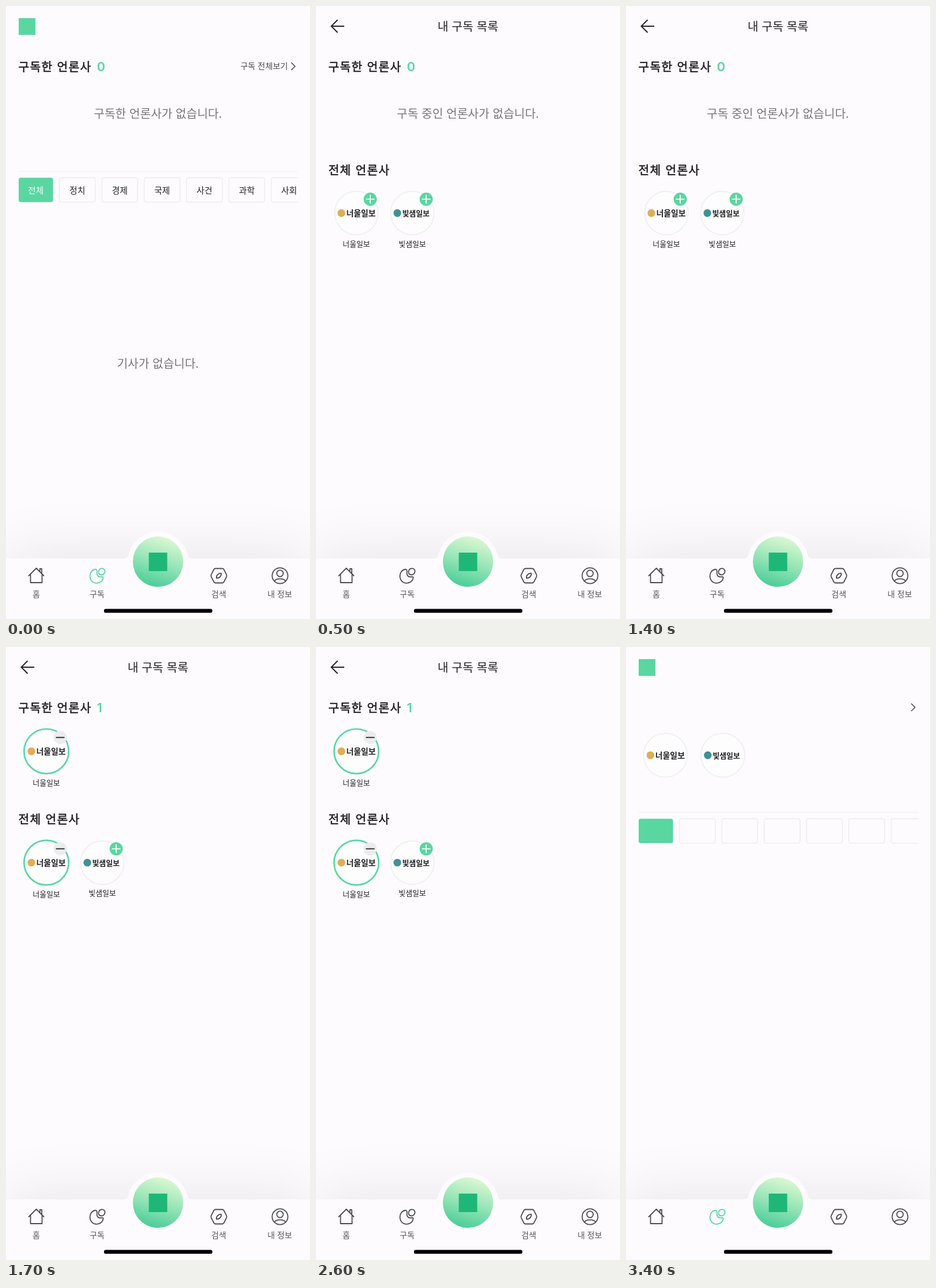
An HTML page that plays this animation: 527x1062 px, repeating every 3.5 s.

```html
<!DOCTYPE html>
<html lang="ko">
<head>
<meta charset="utf-8">
<title>내 구독 목록</title>
<style>
  html, body { margin: 0; width: 100%; height: 100%; overflow: hidden; background: #fdfbfe; }
  #stage { position: relative; width: 527px; height: 1062px; overflow: hidden; }
  #shade { position: absolute; left: 0; top: 957px; width: 527px; height: 105px;
           box-shadow: 0 0 110px rgba(0, 0, 0, .1); }
  svg { position: absolute; left: 0; top: 0; display: block; }
  text { font-family: "Noto Sans CJK KR", "Noto Sans KR", "Noto Sans CJK", "Noto Sans CJK JP", sans-serif; }
  .head { letter-spacing: 1.35px; stroke: #222124; stroke-width: .6px; }
  .num { font-family: Inter, sans-serif; font-weight: 600; }
  .icon { fill: none; stroke: #4b4a4d; stroke-width: 1.8; stroke-linecap: round; stroke-linejoin: round; }
</style>
</head>
<body>
<div id="stage">
  <div id="shade"></div>
  <svg id="art" width="527" height="1062" viewBox="0 0 527 1062">
    <defs>
      <linearGradient id="mint" x1=".68" y1="0" x2=".38" y2="1">
        <stop offset="0" stop-color="#dff8d3"/>
        <stop offset=".5" stop-color="#98e5b8"/>
        <stop offset="1" stop-color="#4acd97"/>
      </linearGradient>
      <clipPath id="row"><rect x="0" y="290" width="506" height="60"/></clipPath>
    </defs>
    <g id="page"></g>
    <path d="M0 957H204Q211 957 212 951A53 53 0 0 1 315 951Q316 957 323 957H527V1062H0Z" fill="#fdfbfe"/>
    <circle cx="263.5" cy="962.7" r="43.6" fill="url(#mint)"/>
    <rect x="247.5" y="947" width="32" height="32" fill="#1fb777"/>
    <g class="icon">
      <path d="M39.5 987L52.5 974L65.5 987M42.5 984.5V999H62.5V984.5M58.8 979.5V975H62V983"/>
      <g id="pie">
        <path d="M154.5 976C148.5 977 145.5 982.5 145.5 987.5C145.5 994.5 150.5 999.8 157 999.8C163 999.8 167.8 996 168.6 990.5C168.8 988.6 167 988.6 165 989C160.5 989.6 157.5 987 157.6 983C157.8 979.5 158.5 975.4 154.5 976Z"/>
        <path d="M161 983.5C159.3 979 161.5 974.6 166 974.4C169.8 974.3 172 977 171.4 980.3C170.6 984.6 165.5 987.6 161 983.5Z"/>
      </g>
      <path d="M363.2 974.5H374.8Q376.6 974.5 377.6 976L382.2 985.2Q383 987 382.2 988.8L377.6 998Q376.6 999.5 374.8 999.5H363.2Q361.4 999.5 360.4 998L355.8 988.8Q355 987 355.8 985.2L360.4 976Q361.4 974.5 363.2 974.5Z"/>
      <path d="M373 982.6C374 986.5 371 991.2 365 991.4C364 987 367.5 982.8 373 982.6Z"/>
      <circle cx="475" cy="987" r="13.6"/>
      <circle cx="475" cy="983" r="5.6"/>
      <path d="M465.5 996.5C468 991 482 991 484.5 996.5"/>
    </g>
    <g id="labels"></g>
    <rect x="169.8" y="1044.6" width="188" height="6.7" rx="3.3" fill="#000"/>
  </svg>
</div>
<script>
const GREEN = '#5ad6a1', INK = '#222124', LINE = '#f0eff2', GREY = '#777679';
const LOOP = 3500;
// time, screen, subscriptions, text ready
const STEPS = [
  [0, 'home', 0, true],
  [300, 'list', 0, true],
  [1500, 'list', 1, true],
  [2800, 'list', 2, true],
  [3400, 'home', 2, false]
];
const PAPERS = [
  { name: '너울일보', color: '#dfae55', size: 13.9 },
  { name: '빛샘일보', color: '#3f9194', size: 12.9 }
];
const CHIPS = ['전체', '정치', '경제', '국제', '사건', '과학', '사회'];
const NAV = [['홈', 52.5], ['구독', 158], ['검색', 369], ['내 정보', 474.5]];

const text = (s, x, y, size, fill, extra = '') =>
  `<text x="${x}" y="${y}" font-size="${size}" fill="${fill}" ${extra}>${s}</text>`;
const mid = (s, x, y, size, fill) => text(s, x, y, size, fill, 'text-anchor="middle"');
const head = (s, y) => text(s, 21.6, y, 20.27, INK, 'class="head"');
const count = n => text(n, 157.5, 113, 22, GREEN, 'class="num"');
const path = (d, color, w) => `<path d="${d}" fill="none" stroke="${color}" stroke-width="${w}"/>`;

function brand(p, x, y) {
  return `<circle cx="${x - 26}" cy="${y}" r="6.7" fill="${p.color}"/>` +
    text(p.name, x - 17.5, y + 5, p.size, INK, 'font-weight="700"');
}

function paper(i, y, on) {
  const p = PAPERS[i], x = 70 + 97 * i, bx = x + 24, by = y - 24;
  const ring = on ? `r="38.7" stroke="${GREEN}" stroke-width="2.7"` : `r="37.6" stroke="${LINE}" stroke-width="2"`;
  const sign = `M${bx - 7.5} ${by}h15` + (on ? '' : `M${bx} ${by - 7.5}v15`);
  return `<circle cx="${x}" cy="${y}" fill="#fefdfe" ${ring}/>` + brand(p, x, y) +
    `<circle cx="${bx}" cy="${by}" r="11.4" fill="${on ? '#ececee' : GREEN}"/>` +
    path(sign, on ? INK : '#fff', 1.8) +
    mid(p.name, x, y + (on ? 59 : 57.8), 12.9, INK);
}

function list(n) {
  const low = n ? 373.6 : 358.7;
  let s = path('M49 35H27M37.5 24L26.5 35L37.5 46', INK, 2) +
    mid('내 구독 목록', 263.3, 42.5, 20.4, INK) +
    head('구독한 언론사', 112.5) + count(n) + head('전체 언론사', n ? 305.5 : 292);
  if (!n) s += mid('구독 중인 언론사가 없습니다.', 263.3, 194.3, 20.27, GREY);
  PAPERS.forEach((p, i) => {
    if (i < n) s += paper(i, 180.7, true);
    s += paper(i, low, i < n);
  });
  return s;
}

function home(n, ready) {
  let s = `<rect x="22" y="21" width="29" height="29" fill="${GREEN}"/>` +
    path('M494.5 98L501 104.5L494.5 111', '#4b4a4d', 1.6) +
    path('M22 286.5H506', '#efeef1', 1.2);
  if (ready) {
    s += head('구독한 언론사', 112.5) + count(n) +
      text('구독 전체보기', 406.3, 109.4, 14.2, '#4b4a4d') +
      mid('기사가 없습니다.', 263.3, 626.5, 20.27, GREY);
    if (!n) s += mid('구독한 언론사가 없습니다.', 263.3, 194.3, 20.27, GREY);
  }
  PAPERS.slice(0, n).forEach((p, i) => {
    const x = 68.3 + 99.5 * i;
    s += `<circle cx="${x}" cy="187.5" r="38" fill="#fefdfe" stroke="${LINE}" stroke-width="2"/>` +
      brand(p, x, 187.5);
  });
  s += '<g clip-path="url(#row)">';
  CHIPS.forEach((c, i) => {
    const x = i ? 19.4 + 73.4 * i : 22, w = i ? 62 : 59.5;
    const paint = i ? 'fill="#fdfbfe" stroke="#ebeaed" stroke-width="1.3"' : `fill="${GREEN}"`;
    s += `<rect x="${x}" y="297.5" width="${w}" height="42.3" rx="3.5" ${paint}/>`;
    if (ready) s += mid(c, x + w / 2, 325, 14.9, i ? INK : '#effcf5');
  });
  return s + '</g>';
}

const el = id => document.getElementById(id);
const navText = NAV.map(([s, x]) => mid(s, x, 1024, 14, '#555457')).join('');
let shown = null;

function draw() {
  const t = performance.now() % LOOP;
  const step = STEPS.filter(s => s[0] <= t).pop();
  if (step !== shown) {
    shown = step;
    const [, screen, n, ready] = step;
    el('page').innerHTML = screen === 'home' ? home(n, ready) : list(n);
    el('labels').innerHTML = ready ? navText : '';
    el('pie').style.stroke = screen === 'home' ? GREEN : '';
  }
  requestAnimationFrame(draw);
}
draw();
</script>
</body>
</html>
```
